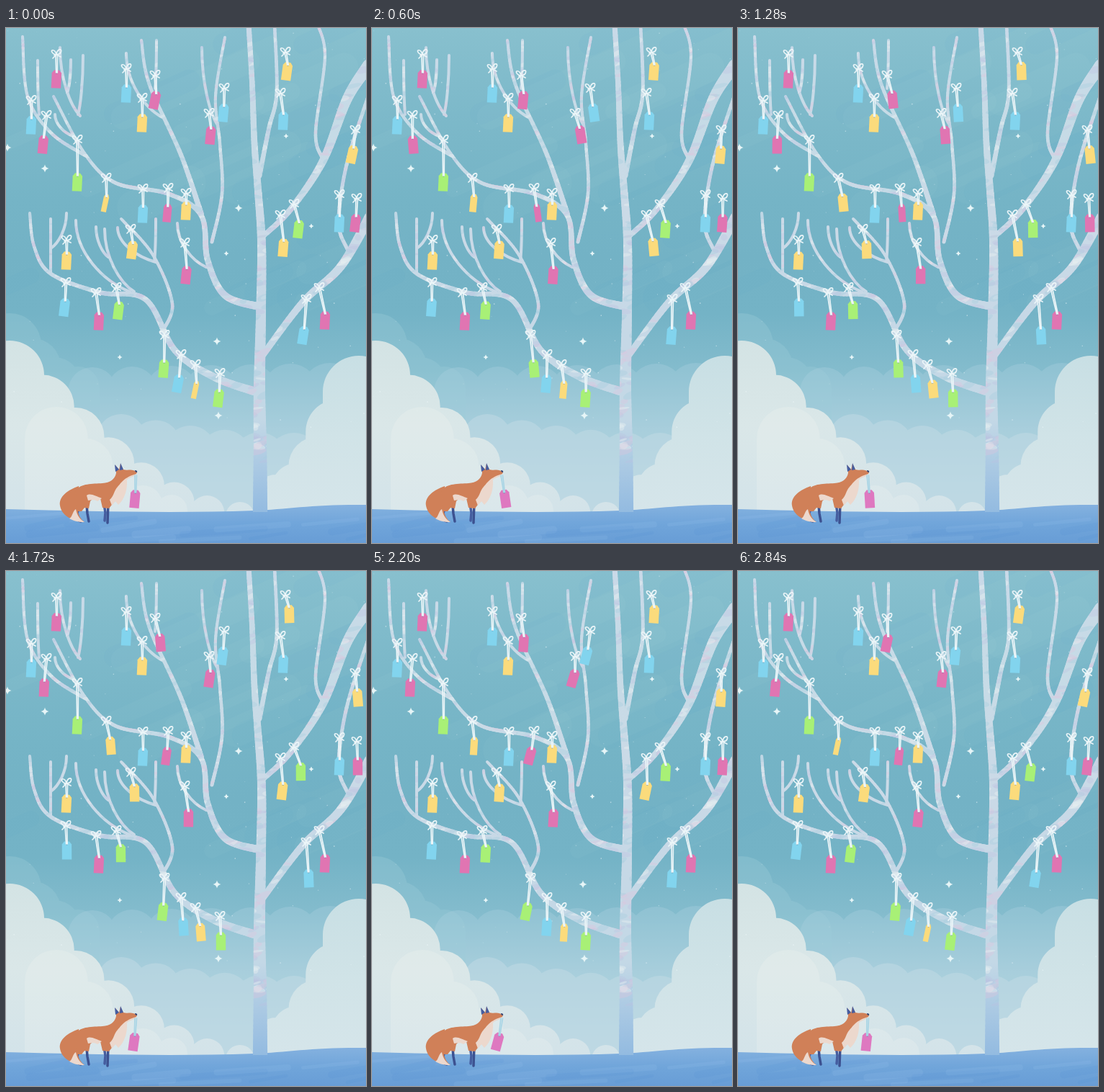
Write an HTML page with a canvas that moves like this. It is 500 by 715 pixels and loops after 2880 ms.

```html
<!DOCTYPE html>
<html lang="en">
<head>
<meta charset="utf-8">
<title>Wishing tree</title>
<style>
  html, body { margin: 0; width: 100%; height: 100%; overflow: hidden; background: #7bb7c9; }
  canvas { display: block; width: 500px; height: 715px; }
</style>
</head>
<body>
<canvas id="stage" width="500" height="715"></canvas>
<script>
const W = 500, H = 715, LOOP = 2880, STEP = 40;
const { sin, cos, PI, hypot, atan2, abs } = Math;
const stage = document.getElementById('stage').getContext('2d');

function layer() {
  const canvas = document.createElement('canvas');
  canvas.width = W;
  canvas.height = H;
  return canvas.getContext('2d');
}

let seed = 7;
function random(min = 0, max = 1) {
  seed = (seed * 16807) % 2147483647;
  return min + (max - min) * seed / 2147483647;
}

const mix = (a, b, u) => a + (b - a) * u;

function gradient(g, y0, y1, ...colors) {
  const fill = g.createLinearGradient(0, y0, 0, y1);
  colors.forEach((c, i) => fill.addColorStop(i / (colors.length - 1), c));
  return fill;
}

function fillPath(g, color, d) {
  g.fillStyle = color;
  g.fill(new Path2D(d));
}

function strokePath(g, color, width, d) {
  g.strokeStyle = color;
  g.lineWidth = width;
  g.stroke(new Path2D(d));
}

// ---- Sky and clouds ----
// A bank of round bumps from (x0, y0) to (x1, y1), filled down to the ground.
function cloudBank(g, fill, x0, y0, x1, y1, r0, r1, count) {
  g.fillStyle = fill;
  g.beginPath();
  for (let i = 0; i < count; i++) {
    const u = i / (count - 1);
    const x = mix(x0, x1, u), y = mix(y0, y1, sin(u * PI / 2)), r = mix(r0, r1, u);
    g.moveTo(x + r, y);
    g.arc(x, y, r, 0, 7);
    g.rect(x - r, y, 2 * r, H - y);
  }
  g.fill();
}

function sparkle(g, x, y, r) {
  const q = r * 0.18;
  fillPath(g, '#e6f5f7', `M${x} ${y - r}Q${x + q} ${y - q} ${x + r} ${y}Q${x + q} ${y + q} ${x} ${y + r}` +
    `Q${x - q} ${y + q} ${x - r} ${y}Q${x - q} ${y - q} ${x} ${y - r}Z`);
}

function drawSky(g) {
  g.fillStyle = gradient(g, 0, H, '#88c0ce', '#80bbcb', '#7ab7c8', '#75b4c6', '#73b2c5',
    '#74b3c6', '#84bccd', '#a9cedb', '#c0dae4', '#cde0e8');
  g.fillRect(0, 0, W, H);

  g.lineCap = 'round';
  for (let i = 0; i < 26; i++) {
    const x = random(-60, 460), y = random(0, 420), len = random(60, 180);
    strokePath(g, i % 2 ? 'rgba(255,255,255,.025)' : 'rgba(70,150,180,.035)', random(15, 50),
      `M${x} ${y}l${len} ${-len * 0.45}`);
  }

  cloudBank(g, 'rgba(150,200,212,.4)', 5, 440, 100, 500, 44, 30, 4);
  cloudBank(g, 'rgba(165,205,219,.4)', 120, 505, 450, 505, 34, 40, 7);
  cloudBank(g, 'rgba(195,219,230,.5)', 160, 570, 400, 600, 34, 38, 6);
  cloudBank(g, gradient(g, 432, 670, '#d3e3e4', '#dae7e8', '#d3e3e9'), 5, 482, 325, 678, 48, 20, 8);
  cloudBank(g, gradient(g, 455, 670, '#c8dfe4', '#d0e3e7', '#d5e5ea'), 490, 505, 375, 650, 50, 30, 5);
  cloudBank(g, 'rgba(240,243,238,.25)', 70, 570, 230, 670, 44, 22, 5);

  for (let i = 0; i < 110; i++) {
    g.fillStyle = `rgba(240,250,252,${random(0.15, 0.6)})`;
    const size = random(0.6, 1.6);
    g.fillRect(random(0, W), random(0, 560), size, size);
  }
  for (const [x, y] of [[54, 195], [2, 166], [323, 250], [293, 435], [295, 538]]) sparkle(g, x, y, 5.5);
  for (const [x, y] of [[389, 150], [306, 313], [424, 275], [158, 457]]) sparkle(g, x, y, 3.5);
}

// ---- Tree ----
// Smooth limb through x, y pairs, thick at its first point and thin at its last.
function limb(g, thick, thin, ...xy) {
  const last = xy.length / 2 - 1;
  const point = i => {
    const k = 2 * Math.max(0, Math.min(last, i));
    return [xy[k], xy[k + 1]];
  };
  let from = point(0);
  for (let i = 0; i < last; i++) {
    const [a, b, c, d] = [-1, 0, 1, 2].map(k => point(i + k));
    for (let s = 1; s <= 16; s++) {
      const u = s / 16;
      const to = [0, 1].map(k => b[k] + 0.5 * u * (c[k] - a[k] +
        u * (2 * a[k] - 5 * b[k] + 4 * c[k] - d[k] + u * (3 * (b[k] - c[k]) + d[k] - a[k]))));
      g.lineWidth = mix(thin, thick, (1 - (i + u) / last) ** 1.5);
      g.beginPath();
      g.moveTo(...from);
      g.lineTo(...to);
      g.stroke();
      from = to;
    }
  }
}

// A twig leaves its limb sideways at (x, y) and bends upright towards its tip.
function twig(g, x, y, tipX, tipY) {
  const dx = tipX - x, dy = tipY - y;
  g.lineWidth = 4;
  g.beginPath();
  g.moveTo(x, y);
  g.bezierCurveTo(x + 0.5 * dx, y + 0.15 * dy, tipX, y + 0.55 * dy, tipX, tipY);
  g.stroke();
}

function drawTree(g) {
  g.lineCap = 'round';
  g.strokeStyle = gradient(g, 0, 680, '#c9d9e8', '#c6dbe6', '#cbdae7', '#c6d8e6', '#c3d8e6', '#90b9e0');

  // Trunk, then the limbs to the right
  limb(g, 21, 7, 353, 690, 353, 590, 352, 500, 354, 400, 355, 300, 350, 225, 345, 160, 342, 80, 337, -5);
  limb(g, 7, 4.5, 352, 205, 365, 140, 376, 90, 373, -5);
  limb(g, 18, 7, 504, 52, 474, 98, 440, 185, 395, 252, 356, 290);
  limb(g, 5, 4, 439, 180, 430, 145, 443, 40, 433, -5);
  limb(g, 14, 9, 505, 262, 465, 331, 412, 381, 356, 455);
  limb(g, 5, 5, 474, 307, 462, 270, 473, 190, 503, 95);

  // Upper left
  limb(g, 11, 4, 352, 387, 304, 371, 280, 322, 271, 260, 225, 230, 152, 215, 109, 174, 66, 95);
  limb(g, 8, 4, 271, 258, 243, 176, 199, 78, 188, 17);
  limb(g, 5, 4, 286, 297, 300, 230, 297, 160, 291, 95, 304, 13);
  limb(g, 5, 4, 110, 177, 63, 146, 30, 95, 23, 12);
  twig(g, 217, 124, 167, 35);
  twig(g, 207, 84, 209, 17);
  twig(g, 294, 135, 272, 27);
  twig(g, 46, 120, 44, 45);
  twig(g, 103, 122, 75, 27);
  twig(g, 85, 90, 90, 44);
  twig(g, 100, 120, 107, 38);
  twig(g, 93, 150, 68, 120);

  // Lower left
  limb(g, 12, 4, 350, 506, 290, 485, 235, 448, 194, 377, 130, 367, 62, 341, 39, 303, 33, 257);
  limb(g, 5, 4, 216, 423, 231, 383, 204, 315, 160, 265);
  twig(g, 172, 366, 97, 267);
  twig(g, 62, 341, 62, 265);
  twig(g, 62, 306, 84, 257);
  twig(g, 178, 366, 137, 279);
  twig(g, 142, 318, 125, 276);
  twig(g, 208, 325, 155, 277);
  twig(g, 206, 324, 208, 265);
  twig(g, 278, 332, 238, 271);

  // Painted bark
  g.globalCompositeOperation = 'source-atop';
  const tints = ['rgba(235,242,243,.4)', 'rgba(190,192,226,.3)', 'rgba(225,195,220,.32)', 'rgba(166,205,224,.35)'];
  for (let i = 0; i < 1500; i++) {
    g.fillStyle = tints[i % 4];
    g.beginPath();
    g.ellipse(random(0, W), random(0, 600), random(4, 16), random(1.5, 5), random(-0.5, 0.2), 0, 7);
    g.fill();
  }
  g.globalCompositeOperation = 'source-over';
}

// ---- Ground and fox ----
function drawGround(g) {
  const hill = 'M0 668C120 671 230 674 345 670C390 668 430 661 500 662V715H0Z';
  fillPath(g, gradient(g, 662, H, '#84b1df', '#70a5da', '#689dd6'), hill);
  g.save();
  g.clip(new Path2D(hill));
  for (let i = 0; i < 14; i++)
    strokePath(g, i % 2 ? 'rgba(160,200,235,.13)' : 'rgba(80,140,205,.13)', random(4, 12),
      `M${random(-40, 480)} ${random(680, 715)}l${random(50, 120)} ${random(-14, -4)}`);
  g.restore();
}

function drawFox(g) {
  const orange = '#d08058', cream = '#ecd8cd', navy = '#455d9f';
  g.lineCap = g.lineJoin = 'round';
  strokePath(g, '#3c5190', 3.5, 'M112 662L113 674L115 685M142 658L141 687');
  strokePath(g, navy, 3.5, 'M103 664L99 673L101 684L104 685M136 660L138 673L137 684');
  fillPath(g, orange, 'M101 636C87 641 73 650 75 663C77 675 88 684 109 686C99 678 97 668 103 652Z');
  fillPath(g, cream, 'M88 681C93 678 92 671 97 668C99 678 103 682 109 686C100 686 93 684 88 681Z');
  fillPath(g, orange, 'M97 642C104 632 120 633 134 632C145 631 151 627 153 618L152 607L157 613L159 605L163 613' +
    'C170 615 176 611 182 617C180 622 172 623 167 627C167 642 160 653 150 658L143 667L134 666L131 653' +
    'C124 652 120 653 117 657L115 667L109 666L105 671L98 671C101 662 96 655 97 642Z');
  fillPath(g, cream, 'M181 619C177 623 171 624 168 627C169 642 164 655 156 662L152 657L147 663L144 655' +
    'C150 650 150 642 155 637C160 632 163 624 181 619Z');
  fillPath(g, cream, 'M112 649C117 645 125 650 133 653L127 657C121 654 118 656 114 656Z');
  fillPath(g, navy, 'M152 616L151 606L157 613ZM158 614L159 604L163 613Z');
  fillPath(g, '#374572', 'M179 614q4 0 3 3q-3 0-3-3Z');
}

// ---- Tags ----
// Each motion turns the loop's phase into a swing from -1 to 1; reach is in pixels.
const still = { reach: 0, swing: () => 0 };
const gentle = { reach: 1.8, swing: p => -cos(p) };
const wide = { reach: 4.2, swing: gentle.swing };
const lively = { reach: 5.5, swing: p => cos(p - 1.75) };
const flutter = { reach: 6, swing: p => ((1 + sin(p)) / 2) ** 2 * cos(3 * p - PI) };

const colors = { blue: '#82d4ee', pink: '#e075b2', yellow: '#fbdb7c', green: '#a8f076', orchid: '#de78c0' };
const tags = [];

// Hangs a tag with its middle at (x, y); a turning tag is seen edge-on at one end of its swing.
function hang(motion, color, x, y, { lean = 0, drop = 34, turn = 0, bowed = true } = {}) {
  tags.push({ motion, color: colors[color], x, y, lean, drop, turn, bowed });
}

hang(still, 'blue', 35, 135);
hang(still, 'pink', 70, 71);
hang(still, 'green', 99, 214, { drop: 58 });
hang(still, 'blue', 167, 91);
hang(still, 'yellow', 189, 132);
hang(still, 'blue', 190, 258);
hang(still, 'yellow', 250, 254, { drop: 24 });
hang(still, 'yellow', 84, 323, { drop: 28 });
hang(still, 'pink', 129, 407, { lean: 4, drop: 39 });
hang(still, 'blue', 385, 129, { lean: 4, drop: 38 });
hang(still, 'blue', 463, 271, { drop: 39 });
hang(still, 'pink', 443, 406, { lean: 8, drop: 45 });
hang(gentle, 'yellow', 177, 308, { lean: 4, drop: 28 });
hang(gentle, 'pink', 252, 343, { lean: 4, drop: 44 });
hang(gentle, 'blue', 83, 388);
hang(gentle, 'green', 158, 392, { lean: 5, drop: 31 });
hang(gentle, 'green', 297, 514);
hang(gentle, 'yellow', 392, 60, { lean: 4, drop: 26 });
hang(gentle, 'pink', 487, 271);
hang(gentle, 'green', 408, 279, { lean: 8 });
hang(wide, 'yellow', 142, 243, { lean: 3, turn: -0.45 });
hang(wide, 'pink', 211, 100, { lean: 4 });
hang(wide, 'blue', 243, 494, { drop: 40 });
hang(wide, 'yellow', 267, 502, { lean: 4, turn: -0.45 });
hang(wide, 'yellow', 485, 176);
hang(wide, 'blue', 417, 427, { drop: 50 });
hang(lively, 'pink', 225, 257, { turn: 0.35 });
hang(lively, 'green', 220, 473, { drop: 46 });
hang(lively, 'pink', 285, 149, { lean: 3, drop: 30 });
hang(lively, 'blue', 303, 118);
hang(lively, 'yellow', 386, 305, { lean: 5, drop: 45 });
hang(flutter, 'pink', 53, 162, { lean: -3, drop: 40 });
hang(lively, 'orchid', 180, 654, { drop: 33, bowed: false });

const tagShape = new Path2D('M-3.5-12.5H3.5L6.7-8.5V12.5H-6.7V-8.5Z');
const bow = new Path2D('M0 0C-2-9-10-7-5-2C-3 0-1 0 0 0C1-9 9-9 6-3C5-1 2 0 0 0L-5 5M0 0L6 3M-3 1L3-1');

function drawTag({ motion, color, x, y, lean, drop, turn, bowed }, phase) {
  const swing = motion.swing(phase);
  const kx = x - lean, ky = y - drop, length = hypot(lean, drop);
  const swung = -motion.reach * swing / length;
  const tilt = swung * 1.3 + 0.05;
  const angle = swung - atan2(lean, drop);
  const cx = kx - length * sin(angle), cy = ky + length * cos(angle);
  const hx = cx + 9 * sin(tilt), hy = cy - 9 * cos(tilt);

  stage.save();
  stage.translate(cx, cy);
  stage.rotate(tilt);
  stage.scale(1 - abs(turn) / 2 - turn * swing / 2, 1);
  stage.fillStyle = color;
  stage.fill(tagShape);
  stage.fillStyle = 'rgba(85,120,150,.6)';
  stage.beginPath();
  stage.arc(0, -9, 1.5, 0, 7);
  stage.fill();
  stage.restore();

  stage.lineCap = stage.lineJoin = 'round';
  strokePath(stage, bowed ? '#ebf5f8' : '#a9d5e5', 1.7,
    `M${kx - 1} ${ky}L${hx - 0.8} ${hy}M${kx + 1.5} ${ky}L${hx + 0.8} ${hy}`);
  if (!bowed) return;
  stage.save();
  stage.translate(kx, ky);
  stage.stroke(bow);
  stage.restore();
}

// ---- Scene ----
const scene = layer(), tree = layer();
drawSky(scene);
drawTree(tree);
drawGround(scene);
scene.drawImage(tree.canvas, 0, 0, W, 672, 0, 0, W, 672);
drawFox(scene);

function frame(now) {
  const time = Math.floor(now % LOOP / STEP) * STEP;
  stage.drawImage(scene.canvas, 0, 0);
  for (const tag of tags) drawTag(tag, 2 * PI * time / LOOP);
  requestAnimationFrame(frame);
}
requestAnimationFrame(frame);
</script>
</body>
</html>
```
